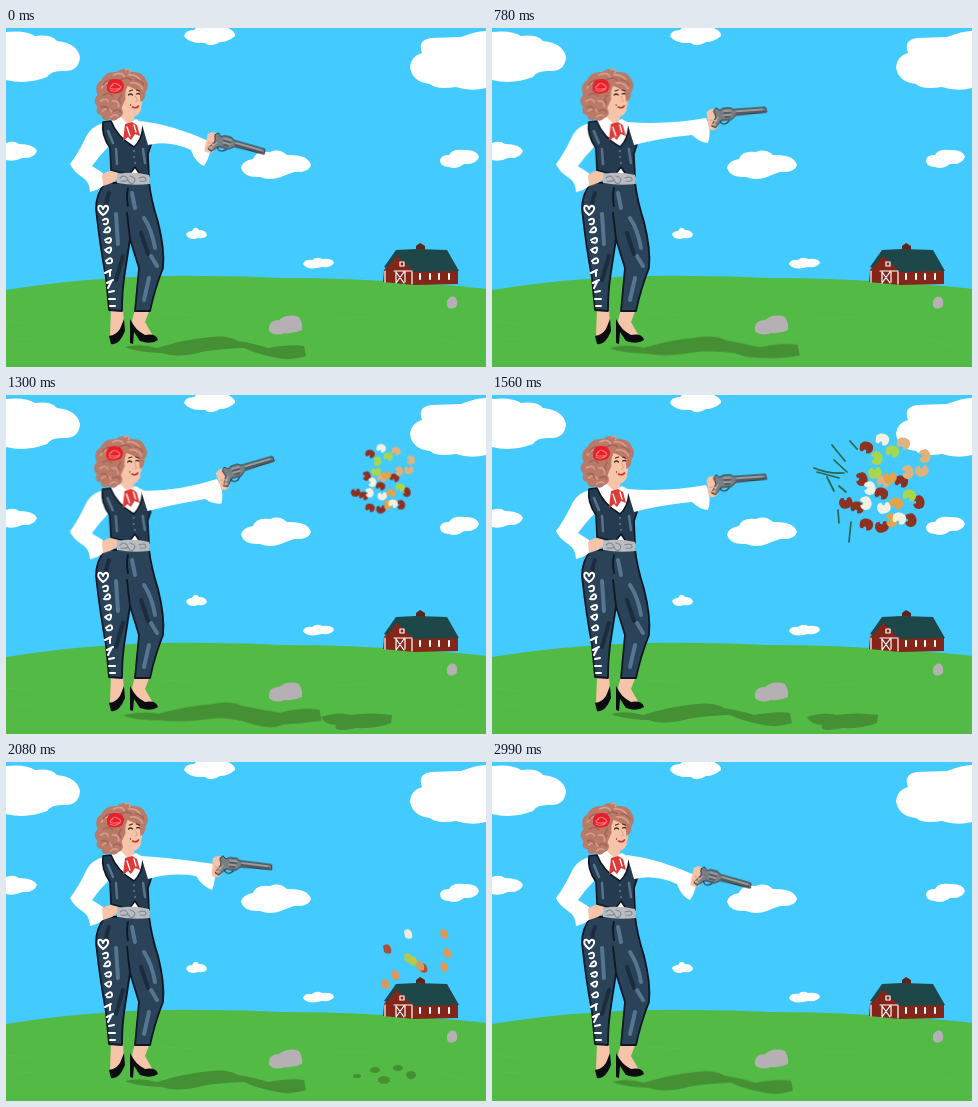
An HTML page without scripts that plays this animation: 480x339 px, repeating every 3.12 s.

```html
<!DOCTYPE html>
<html lang="en">
<head>
<meta charset="utf-8">
<title>Sharpshooter</title>
<style>
html, body { margin: 0; width: 100%; height: 100%; overflow: hidden; background: #43caff; }
svg { display: block; width: 100vw; height: 100vh; }
.line { fill: none; stroke-linecap: round; stroke-linejoin: round; }
.white { fill: #fff; }
.skin { fill: #f6c4a8; }

/* 24 drawings of 130 ms; steps() holds each in-between drawing */
.anim { animation: 3120ms steps(4) infinite; }
.sleeve { animation-name: sleeve; }
.gun { animation-name: gun; }
.shade { animation-name: shade; }
.upper { animation-name: lean; transform-origin: 125px 155px; }
.streak { animation-name: streak; }
.burst { animation-name: burst; transform-origin: 393px 87px; }
.sparks { animation-name: sparks; }
.far { animation-name: far; }
.burst-shade { animation-name: burst-shade; }
.dots { animation-name: dots; }
.boil { animation: boil 520ms step-end infinite; }

@keyframes sleeve {
  0%, 83.33%, 100% { d: path("M135 93Q168 97 205 114Q205 128 198 138Q189 134 185 122Q163 112 142 117Z"); }
  16.66% { d: path("M135 94Q170 97 211 97Q215 110 209 124Q200 121 194 111Q166 110 142 117Z"); animation-timing-function: steps(2); }
  25%, 50% { d: path("M135 94Q175 97 214 90Q220 102 216 115Q207 114 200 107Q168 110 142 117Z"); }
  25% { animation-timing-function: steps(2); }
  33.33% { d: path("M135 97Q165 97 208 78Q217 88 215 102Q207 105 198 101Q170 108 141 115Z"); }
  66.66% { d: path("M135 94Q168 96 208 102Q211 116 206 128Q196 124 190 114Q166 110 142 117Z"); }
}
@keyframes gun {
  0%, 83.33%, 100% { transform: translate(205px, 113px) rotate(16deg); }
  16.66% { transform: translate(216px, 102px) rotate(0deg); animation-timing-function: steps(2); }
  25%, 50% { transform: translate(220px, 90px) rotate(-4deg); }
  25% { animation-timing-function: steps(2); }
  33.33% { transform: translate(212.5px, 76px) rotate(-28deg); }
  66.66% { transform: translate(211px, 103px) rotate(7deg); }
}
@keyframes shade {
  0%, 20.83%, 50%, 100% { d: path("M119 319Q135 315 151 320Q180 311 205 309Q222 307 232 313Q250 316 262 320Q285 316 298 318L300 328Q285 333 272 330Q250 326 238 320Q205 321 192 325Q170 330 156 325Q130 324 119 319Z"); }
  33.33% { d: path("M115 320Q135 315 154 316Q180 310 205 308Q226 302 240 307Q260 312 285 314Q308 306 329 310L331 322Q302 323 285 327Q280 342 260 338Q245 321 225 320Q192 324 150 324Q126 325 115 320Z"); }
}
@keyframes lean {
  0%, 20.83%, 50%, 100% { transform: none; }
  33.33% { transform: rotate(-1deg); }
}
@keyframes streak {
  0%, 100% { visibility: hidden; transform: none; animation-timing-function: step-end; }
  33.33% { visibility: visible; transform: none; animation-timing-function: steps(2); }
  41.66% { visibility: hidden; transform: translate(90px, 0); animation-timing-function: step-end; }
}
@keyframes burst {
  0%, 100% { visibility: hidden; transform: none; animation-timing-function: step-end; }
  41.66% { visibility: visible; transform: translate(-16px, -4px) scale(.7); animation-timing-function: steps(2); }
  50% { visibility: visible; transform: none; }
  66.66% { visibility: hidden; transform: translate(17px, 110px) scale(.55); animation-timing-function: step-end; }
}
@keyframes sparks {
  0%, 54.16%, 100% { visibility: hidden; animation-timing-function: step-end; }
  45.83% { visibility: visible; animation-timing-function: step-end; }
}
@keyframes far {
  0%, 100% { visibility: hidden; transform: none; animation-timing-function: step-end; }
  66.66% { visibility: visible; transform: none; animation-timing-function: steps(3); }
  79.16% { visibility: hidden; transform: translate(0, 54px); animation-timing-function: step-end; }
}
@keyframes burst-shade {
  0%, 66.66%, 100% { visibility: hidden; animation-timing-function: step-end; }
  41.66% { visibility: visible; animation-timing-function: step-end; }
}
@keyframes dots {
  0%, 79.16%, 100% { visibility: hidden; animation-timing-function: step-end; }
  66.66% { visibility: visible; animation-timing-function: step-end; }
}
@keyframes boil {
  25% { transform: translate(1px, 0); }
  50% { transform: translate(0, .7px); }
  75% { transform: translate(1px, .7px); }
}
</style>
</head>
<body>
<svg viewBox="0 0 480 339" preserveAspectRatio="none">
<defs>
  <path id="bean" d="M-6-2C-6-8 5-8 7-2C8 4 3 7 0 5C1 2-1 0-3 3C-6 4-7 1-6-2Z"/>
  <g id="tilted"><use href="#bean" transform="rotate(65)"/></g>
  <g id="turned"><use href="#bean" transform="rotate(150)"/></g>
  <path id="crumb" d="M-4-3Q-1-6 2-4Q5-1 4 4Q0 6-3 3Z"/>
</defs>

<path fill="#43caff" d="M0 0H480V339H0Z"/>
<g class="white">
  <path d="M0 4Q20 2 29 8Q45 6 51 13Q71 15 74 29Q73 43 59 43Q45 42 41 49Q20 57 0 52Z"/>
  <path d="M178 8Q179 2 188 2L190 0H222Q230 4 229 8Q222 14 214 14Q205 20 199 15Q183 16 178 8Z"/>
  <path d="M404 39Q405 28 416 25Q411 12 425 10L455 9Q470 3 480 3V60Q465 64 450 59Q430 62 424 56Q406 54 404 39Z"/>
  <path d="M0 115Q8 112 13 116Q28 116 31 123Q28 131 16 130Q8 134 0 132Z"/>
  <path d="M235 140Q236 133 247 131Q250 122 264 124Q273 120 281 127Q302 126 305 137Q303 145 288 144Q279 147 275 149Q264 153 254 149Q238 150 235 140Z"/>
  <path d="M434 132Q435 127 443 127Q446 121 457 122Q471 121 473 129Q470 137 458 136Q450 142 443 139Q434 139 434 132Z"/>
  <path d="M180 206Q182 203 186 203Q189 197 193 202Q200 202 201 207Q199 211 192 210Q182 213 180 206Z"/>
  <path d="M297 236Q299 231 306 232Q311 228 316 231Q327 230 328 235Q325 240 316 239Q301 243 297 236Z"/>
</g>
<path fill="#53ba45" d="M0 262Q50 254 95 251Q150 247 200 248Q240 248 275 250Q350 250 400 255Q450 257 480 261V339H0Z"/>
<g class="line" stroke="#4cc15a" stroke-width="1">
  <path d="M0 293l32 3M325 291l42-2M155 285l36 2M432 310l28 8M10 310l18 1M475 328l5-2"/>
</g>

<!-- falling beans, behind the barn -->
<g class="anim far">
  <g fill="#a8503a"><use href="#crumb" x="381" y="187"/><use href="#crumb" x="417" y="206"/></g>
  <g fill="#b8c84a"><use href="#crumb" x="402" y="196"/><use href="#crumb" x="407" y="199"/></g>
  <g fill="#d99a5c"><use href="#crumb" x="389" y="213"/><use href="#crumb" x="441" y="191"/><use href="#crumb" x="379" y="222"/><use href="#crumb" x="438" y="205"/><use href="#crumb" x="438" y="172"/><use href="#crumb" x="414" y="204"/></g>
  <use href="#crumb" x="402" y="172" fill="#f2ead9"/>
</g>

<!-- barn -->
<path fill="#84251a" d="M377 254L378 242L391 226L409 240L452 242V256L408 257Z"/>
<path fill="#1d4749" d="M390 222L410 221L441 222L453 243L408 244L391 228L381 240L378 239Z"/>
<path fill="#59251f" d="M410 221V218L414 215L419 218V222Z"/>
<g class="line" stroke="#fff" stroke-width="1.2">
  <path d="M379 243V254M388 243h18M390 254V244L398 255M398 244L390 255M399 254V244M406 244V256M394 234h4v4h-4Z"/>
  <path d="M414 246v5M424 246v5M433 246v5M443 246v5" stroke-width="2"/>
</g>

<g fill="#b4b0b3">
  <path d="M263 299Q264 292 273 292Q282 285 293 289Q297 295 296 302Q288 306 279 305Q269 309 263 303Z"/>
  <path d="M441 273Q444 267 449 269Q453 274 450 279Q444 283 441 278Z"/>
</g>

<!-- ground shadows -->
<g fill="#458f34">
  <g class="boil"><path class="anim shade" d="M119 319Q135 315 151 320Q180 311 205 309Q222 307 232 313Q250 316 262 320Q285 316 298 318L300 328Q285 333 272 330Q250 326 238 320Q205 321 192 325Q170 330 156 325Q130 324 119 319Z"/></g>
  <path class="anim burst-shade" d="M315 322Q332 316 344 320Q365 317 386 320L385 328Q370 334 351 333Q326 338 330 330Q318 329 315 322Z"/>
  <g class="anim dots">
    <ellipse cx="369" cy="308" rx="5" ry="3"/><ellipse cx="392" cy="306" rx="5" ry="3"/>
    <ellipse cx="378" cy="318" rx="6" ry="4"/><ellipse cx="405" cy="313" rx="5" ry="4"/><ellipse cx="351" cy="314" rx="4" ry="2"/>
  </g>
</g>

<!-- legs and shoes -->
<path class="skin" d="M105 281H117L118 296L108 309L104 307ZM129 281H144L139 294L147 308L131 306L126 293Z"/>
<path fill="#0b0c10" d="M103 308Q110 307 114 301L118 291L119 303Q113 318 105 316ZM124 291Q129 302 139 307Q150 305 152 312Q145 317 134 313L128 304L127 316L124 315Z"/>
<path fill="#2b4359" stroke="#0e1722" stroke-width="1.8" stroke-linejoin="round" d="M99 155Q90 166 90 181Q94 218 100 250L103 282L116 283Q116 262 119 244L124 211L133 240L129 283L144 283Q149 260 157 240Q159 222 152 194Q145 172 143 154Z"/>
<g class="line">
  <path stroke="#0e1722" stroke-width="1.8" d="M124 211L121 185M122 178Q120 168 122 160"/>
  <path stroke="#567590" stroke-width="4" d="M138 190Q146 202 149 220M145 228L151 238M126 165L129 180M110 186L112 216M143 250L138 272"/>
  <path stroke="#1a2c3d" stroke-width="4" d="M103 165Q99 175 101 181M117 228L110 252M135 205L142 226"/>
  <path stroke="#fff" stroke-width="2" d="M97 187Q90 181 93 178Q96 177 97 181Q99 176 102 179Q103 183 97 187M97 192q5-3 5 1t-4 3M99 202q4-5 5-1t-6 3M99 212q6-4 6 0t-5 2M99 222q7-5 6 0t-5 1M100 233q5-5 6-1t-5 3M99 245l6-3M104 243v5M101 255l6-3M105 254l-3 6M103 264l5-1M103 271h6M104 278h5"/>
</g>

<!-- torso, head and resting arm -->
<g class="anim upper">
  <path class="white" d="M99 95Q85 97 79 111Q71 127 64 136Q67 143 76 149Q84 154 84 164Q93 162 98 157L97 145L86 138Q94 127 103 118Z"/>
  <path class="skin" d="M96 147Q102 141 111 144L114 149L106 155L97 158ZM112 80L128 84L129 110L115 105Z"/>
  <path class="white" d="M104 93L115 89L122 96L130 91L139 96L140 114L128 120L111 112ZM126 141L133 139L132 147L125 147Z"/>
  <path fill="#253b50" stroke="#0e1722" stroke-width="1.6" stroke-linejoin="round" d="M97 94L105 93Q111 109 128 119Q136 112 137 98L145 117L142 126L143 148L133 145L129 139L123 147L105 142L104 120Q95 107 97 94Z"/>
  <g class="line">
    <path stroke="#58748b" stroke-width="2.5" d="M102 103L107 115M110 121L111 136M137 121L139 135"/>
    <path stroke="#9bb0bf" stroke-width="1.5" d="M128 123v.1M128 129v.1M129 135v.1"/>
  </g>
  <path fill="#dd3a38" d="M119 96L126 94L131 97L134 108L129 106L125 112L122 109L117 113Z"/>
  <path class="line" stroke="#fff" stroke-width="1.3" d="M121 99L124 108M128 97L130 104"/>
  <path fill="#babcc0" d="M111 146Q128 143 143 147L144 156Q127 158 111 155Z"/>
  <path class="line" stroke="#818991" stroke-width="1.2" d="M114 150q4-4 7 0t-6 3M124 148q7 2 4 6t-6-2M133 150q6-2 7 1t-6 2"/>

  <g transform="translate(1.5 0)">
    <path class="skin" d="M112 60Q116 53 126 56Q133 57 134 66L135 72L133 83Q129 91 122 88Q113 84 112 75Z"/>
    <path fill="#bb7a68" d="M90 67Q86 57 94 52Q98 43 109 44Q117 38 124 44Q135 43 138 51Q143 58 138 64Q138 72 133 74L132 64Q124 59 120 58Q117 64 118 71L114 80Q118 87 111 90Q107 95 102 91Q94 94 94 87Q87 86 90 79Q84 73 90 67Z"/>
    <g class="line" stroke-width="1.6">
      <path stroke="#d3a08d" d="M94 60q5-8 9-3M106 47q8-4 11 2M121 47q9-1 12 6M93 73q6-4 8 1M95 83q6-5 9 1M105 73q7-1 6 6M123 55q9-1 12 6M103 89q5-4 7-1M118 42q5-3 4 3"/>
      <path stroke="#a2645a" d="M96 67q6-4 9 1M113 52q7-4 11 0M94 79q5-2 7 3M106 83q6-3 7 1M128 52q6 0 8 5M103 52q-5 0-7 5M114 67q-4 5-1 8"/>
      <path stroke="#4a2b28" stroke-width="1.3" d="M121 67q2-2 4 0M129 66q2-1 3 0M122 63l3-1M129 62l3 1M123 77v.1"/>
      <path stroke="#c9302d" d="M125 79q4 2 6-1"/>
      <path stroke="#e39b84" stroke-width="1" d="M128 68l2 5-2 1"/>
    </g>
  </g>
  <path fill="#e51f2b" d="M101 57Q103 50 109 51Q116 50 118 57Q118 64 112 65Q104 67 101 62Z"/>
  <path class="line" stroke="#ff7774" stroke-width="1.1" d="M105 58q3-5 8-1t-4 4-2-4M104 62q5 3 10-1"/>
</g>

<path class="anim sleeve white" d="M135 93Q168 97 205 114Q205 128 198 138Q189 134 185 122Q163 112 142 117Z"/>
<g class="anim gun">
  <path class="skin" d="M-5-6Q-1-11 4-8L8 0L5 10Q0 14-4 11Z"/>
  <path fill="#797e82" stroke="#33383d" stroke-width="1" stroke-linejoin="round" d="M2-7L5-10L8-7L12-9H19L22-7L54-7L55-2L24-1L19 3L9 3L3 10L-1 8L4-1Z"/>
  <path class="line" stroke="#33383d" stroke-width="1.1" d="M8 4Q11 10 17 4M24-3H53M12-4h7M13 0h5"/>
  <path class="line" stroke="#b3b8bb" stroke-width="1.2" d="M12-6h7M12-2h7M25-5h26M1 7L6 0"/>
  <path class="line" stroke="#e6a78c" stroke-width="1.4" d="M-2 2l6 1M-2 6l5 1"/>
</g>

<!-- shot and flying beans -->
<g class="anim streak line" stroke-width="1.3">
  <path stroke="#3f7c3c" d="M258 84Q280 82 305 77"/>
  <path stroke="#bdb53c" d="M257 80L303 80M273 83L296 79"/>
  <path stroke="#38604d" d="M260 85L284 81"/>
</g>
<g class="anim sparks line" stroke="#2c6550" stroke-width="1.7">
  <path d="M340 50L353 66M342 65L355 77M322 73Q336 79 352 78M325 77L347 83M335 82L342 96M347 91L354 97M346 115L347 128M359 127L357 147M358 46L365 54"/>
</g>
<g class="anim burst">
  <g fill="#8d3122">
    <use href="#bean" x="374" y="53"/><use href="#tilted" x="369" y="84"/><use href="#bean" x="409" y="87"/><use href="#turned" x="354" y="107"/><use href="#bean" x="389" y="99"/><use href="#tilted" x="426" y="107"/><use href="#bean" x="374" y="130"/><use href="#turned" x="390" y="131"/><use href="#tilted" x="418" y="125"/><use href="#bean" x="365" y="113"/>
  </g>
  <g fill="#a6d74d">
    <use href="#tilted" x="384" y="63"/><use href="#bean" x="400" y="57"/><use href="#turned" x="383" y="77"/><use href="#bean" x="417" y="101"/>
  </g>
  <g fill="#dfb27c">
    <use href="#bean" x="411" y="49"/><use href="#turned" x="430" y="75"/><use href="#tilted" x="415" y="77"/><use href="#bean" x="391" y="87"/><use href="#tilted" x="432" y="61"/>
  </g>
  <g fill="#e3a34b">
    <use href="#turned" x="398" y="82"/><use href="#bean" x="404" y="109"/><use href="#tilted" x="399" y="125"/>
  </g>
  <g fill="#f5f1e2">
    <use href="#bean" x="390" y="45"/><use href="#tilted" x="373" y="108"/><use href="#turned" x="392" y="112"/><use href="#bean" x="407" y="124"/><use href="#tilted" x="377" y="93"/>
  </g>
</g>
</svg>
</body>
</html>
```
